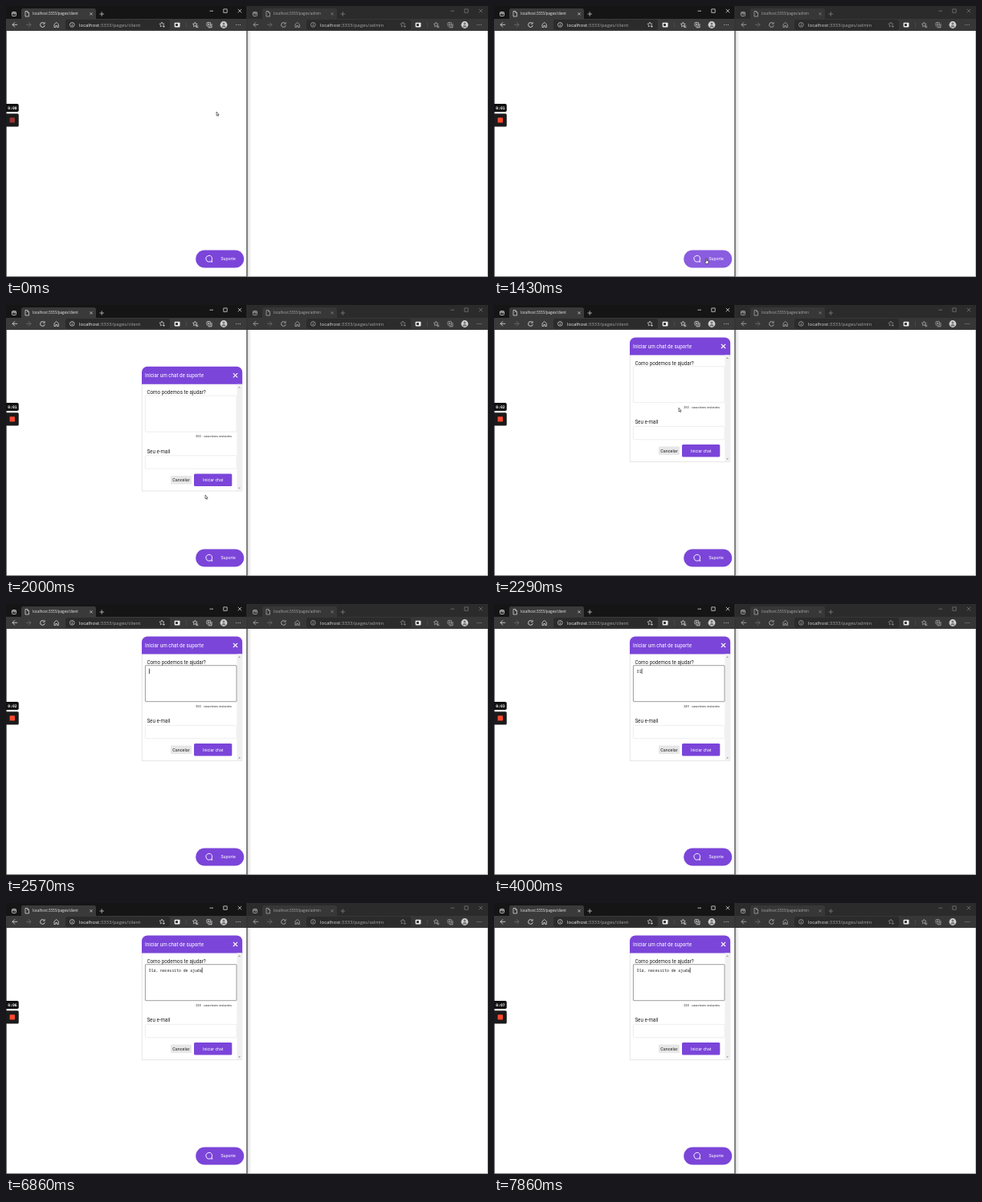
Animation, 600 px wide and 338 px high, one loop 8 s. Source, as an HTML page with a canvas:

```html
<!DOCTYPE html>
<html lang="pt">
<head>
<meta charset="utf-8">
<title>Chat de suporte</title>
<style>
  html, body { margin: 0; width: 100%; height: 100%; overflow: hidden; background: #fff; }
  canvas { display: block; width: 600px; height: 338px; }
</style>
</head>
<body>
<canvas id="stage"></canvas>
<script>
const W = 600, H = 338, LOOP = 8000;
const PURPLE = '#7b45d9', HOVER = '#8a5ce0';
const UI = '"Open Sans", "Noto Sans", sans-serif';
const SANS = 'Roboto, Arial, sans-serif';
const MONO = '"Noto Sans Mono", "DejaVu Sans Mono", monospace';
const MESSAGE = 'Olá, necessito de ajuda';

const OPEN = 1610, RISE = 600, FOCUS = 2430, LAST_KEY = 6860;
const KEYS = [[3570, 0], [3720, 1], [3930, 2], [4140, 3], [4430, 4], [4860, 5],
              [5140, 5], [5860, 11], [6140, 13], [LAST_KEY, 23]];
const MOUSE = [[140, 262, 132], [1140, 264, 316], [1570, 264, 316],
               [2000, 248, 237], [2400, 226, 104]];

const canvas = document.getElementById('stage');
const dpr = window.devicePixelRatio || 1;
canvas.width = W * dpr;
canvas.height = H * dpr;
const c = canvas.getContext('2d');

function rect(x, y, w, h, color) {
  c.fillStyle = color;
  c.fillRect(x, y, w, h);
}

function round(x, y, w, h, r, color) {
  c.beginPath();
  c.roundRect(x, y, w, h, r);
  c.fillStyle = color;
  c.fill();
}

function frame(x, y, w, h, color, r = 0, width = 0.7) {
  c.beginPath();
  c.roundRect(x, y, w, h, r);
  c.strokeStyle = color;
  c.lineWidth = width;
  c.stroke();
}

function line(points, color, width = 0.8, close = false) {
  c.beginPath();
  for (let i = 0; i < points.length; i += 2) c.lineTo(points[i], points[i + 1]);
  if (close) c.closePath();
  c.strokeStyle = color;
  c.lineWidth = width;
  c.stroke();
}

function disc(x, y, r, color) {
  c.beginPath();
  c.arc(x, y, r, 0, 7);
  c.fillStyle = color;
  c.fill();
}

function arc(x, y, r, from, to, color, width = 0.8) {
  c.beginPath();
  c.arc(x, y, r, from, to);
  c.strokeStyle = color;
  c.lineWidth = width;
  c.stroke();
}

function cross(x, y, r, color, width) {
  line([x - r, y - r, x + r, y + r], color, width);
  line([x + r, y - r, x - r, y + r], color, width);
}

function text(str, x, y, size, color, family, weight = '') {
  c.font = `${weight} ${size}px ${family}`;
  c.fillStyle = color;
  c.fillText(str, x, y);
}

function star(x, y, r, color) {
  const pts = [];
  for (let i = 0; i < 10; i++) {
    const a = -Math.PI / 2 + i * Math.PI / 5, d = i % 2 ? r * 0.48 : r;
    pts.push(x + d * Math.cos(a), y + d * Math.sin(a));
  }
  line(pts, color, 0.7, true);
}

// Interpolates rows of [time, ...values].
function track(rows, t, ease = p => p) {
  if (t <= rows[0][0]) return rows[0].slice(1);
  for (let i = 1; i < rows.length; i++) {
    const a = rows[i - 1], b = rows[i];
    if (t < b[0]) {
      const p = ease((t - a[0]) / (b[0] - a[0]));
      return a.slice(1).map((v, k) => v + (b[k + 1] - v) * p);
    }
  }
  return rows[rows.length - 1].slice(1);
}

const smooth = p => p * p * (3 - 2 * p);

function browser(x, page, active) {
  const ink = active ? '#e4e4e4' : '#b4b4b4';
  const dim = active ? '#d8d8d8' : '#8c8c8c';
  const bar = active ? '#3a3a3a' : '#373737';
  c.save();
  c.translate(x, 0);
  rect(0, 0, 300, 17, active ? '#151515' : '#2b2b2b');
  round(19, 3, 93, 16, 2.5, bar);
  rect(0, 16, 300, 15, bar);
  round(74, 17, 130, 12.5, 2.5, '#2b2b2b');

  // Tab strip
  frame(7.5, 7.5, 5, 5, ink, 1, 0.8);
  line([7.5, 9, 12.5, 9], ink, 0.9);
  line([10.2, 9, 10.2, 11], ink, 0.8);
  line([24, 6.5, 26.7, 6.5, 28.5, 8.3, 28.5, 13, 24, 13], ink, 0.7, true);
  line([26.6, 6.6, 26.6, 8.4, 28.4, 8.4], ink, 0.6);
  text('localhost:3333/pages/' + page, 33, 11.3, 4.48, active ? '#eee' : '#aaa', UI);
  cross(106, 9.8, 1.6, dim, 0.7);
  line([116.5, 10, 122, 10], dim, 0.7);
  line([119.2, 7.2, 119.2, 12.8], dim, 0.7);
  const ctl = active ? '#d8d8d8' : '#757575';
  line([253.5, 6.2, 258, 6.2], ctl, 0.8);
  frame(270.8, 3.9, 4.4, 4.4, ctl, 0, 0.8);
  cross(291, 6.1, 2.2, ctl, 0.8);

  // Toolbar
  line([14.2, 23.3, 8, 23.3], ink);
  line([11, 20.3, 8, 23.3, 11, 26.3], ink);
  line([25, 23.3, 31, 23.3], '#707070');
  line([28, 20.3, 31, 23.3, 28, 26.3], '#707070');
  arc(45.5, 23.5, 2.9, 0.2, 5.4, ink);
  line([48.2, 20, 48.2, 22.3, 45.9, 22.3], ink, 0.7);
  line([60, 26.5, 60, 22.9, 62.7, 20.5, 65.4, 22.9, 65.4, 26.5, 63.6, 26.5,
        63.6, 24.5, 61.8, 24.5, 61.8, 26.5], ink, 0.7, true);
  arc(82.3, 23.4, 2.8, 0, 7, ink, 0.7);
  line([82.3, 22.9, 82.3, 25], ink, 0.7);
  rect(81.95, 21.6, 0.7, 0.7, ink);
  text('localhost', 91, 25.5, 6, active ? '#f4f4f4' : '#ddd', UI);
  const host = c.measureText('localhost').width;
  text(':3333/pages/' + page, 91 + host, 25.5, 6, '#a4a4a4', UI);
  star(194, 23.3, 3.2, dim);
  round(194.4, 23.8, 3.6, 3.2, 1, '#2b2b2b');
  line([194.9, 25.4, 197.9, 25.4], dim, 0.7);
  line([196.4, 23.9, 196.4, 26.9], dim, 0.7);
  round(209.7, 20.8, 6.8, 5.6, 0.8, '#eee');
  rect(211, 22.2, 3, 2.8, '#333');
  line([224.5, 20.5, 224.5, 26.5], '#555', 0.6);
  star(235.3, 23.3, 3, ink);
  line([236.5, 25, 239.3, 25], ink, 0.7);
  line([236.5, 26.6, 239.3, 26.6], ink, 0.7);
  frame(250, 20.5, 4.6, 4.6, ink, 0.8);
  line([251.7, 26.8, 256, 26.8, 256, 22.2], ink, 0.8);
  line([252.3, 21.6, 252.3, 24], ink, 0.7);
  line([251.1, 22.8, 253.5, 22.8], ink, 0.7);
  disc(271, 23.5, 4.4, '#d2d2d2');
  disc(271, 22.1, 1.5, '#777');
  c.beginPath();
  c.arc(271, 26.5, 2.6, Math.PI, 0);
  c.fill();
  for (let i = 0; i < 3; i++) disc(286.8 + i * 2.3, 23.5, 0.5, ink);
  c.restore();
}

function windows() {
  rect(0, 0, W, H, '#fff');
  browser(300, 'admin', false);
  browser(0, 'client', true);
  rect(300.5, 31, 303 - 300.5, 307, '#e6e6e6');
  rect(303, 31, 2, 307, '#f6f6f6');
  rect(0, 31, 0.8, 307, '#4a4a4a');
  rect(299.4, 0, 1.2, 338, '#333');
  rect(0, 337.3, 300, 0.7, '#4a4a4a');
  rect(300, 337.3, 300, 0.7, '#777');
  rect(599.4, 31, 0.6, 307, '#999');
}

function recorder(t) {
  round(-2, 122, 17.8, 10, 1.8, '#111');
  text('0:0' + Math.max(0, Math.floor((t - 80) / 1000)), 2.2, 128.8, 4.75, '#fff',
    '"DejaVu Sans Mono", monospace', 'bold');
  round(-2, 134.2, 17.8, 16.2, 1.5, '#1b1b1b');
  const p = Math.min(1, Math.max(0, (t - 140) / 400));
  round(4.6, 139.2, 6.4, 6.4, 0.6, `rgb(${150 + 105 * p}, ${52 + 20 * p}, ${52 - 4 * p})`);
}

function supportButton(hover) {
  round(236.2, 304.5, 60, 22, 11, hover ? HOVER : PURPLE);
  arc(252.8, 315.2, 3.8, 1.2, 6.9, '#fff', 0.95);
  line([254.2, 318.8, 256.9, 319.1, 256, 317.2], '#fff', 0.95);
  text('Suporte', 267.4, 317.2, 5.27, '#fff', SANS);
}

function typed(t) {
  return Math.floor(track(KEYS, t)[0] + 1e-6);
}

function caretOn(t) {
  if (t < FOCUS) return false;
  if (t < KEYS[0][0]) return (t - FOCUS) % 1000 < 500;
  return t < LAST_KEY || (t - LAST_KEY) % 1000 < 500;
}

function dialog(t) {
  if (t < OPEN) return;
  const left = 1 - Math.min(1, (t - OPEN) / RISE);
  const n = typed(t), dark = '#222', soft = '#e9e9e9';
  c.save();
  c.beginPath();
  c.rect(0, 31, 300, 306);
  c.clip();
  c.translate(0, 300 * left * left);

  rect(169, 61, 125, 134.8, '#fff');
  frame(169.3, 61, 124.5, 134.6, '#d4d4d4', 0, 0.6);
  round(169, 40.4, 125.2, 22, [7, 7, 0, 0], PURPLE);
  text('Iniciar um chat de suporte', 173, 53.6, 6.3, '#fff', SANS);
  cross(285.5, 51.4, 2.6, '#fff', 1.1);

  rect(287.4, 62.4, 6.2, 133, '#f0f0f0');
  c.fillStyle = '#999';
  for (const [y, d] of [[66.2, -1], [192, 1]]) {
    c.beginPath();
    c.moveTo(289.2, y - d * 0.7);
    c.lineTo(292, y - d * 0.7);
    c.lineTo(290.6, y + d * 0.9);
    c.fill();
  }

  text('Como podemos te ajudar?', 175.4, 74.8, 6.28, dark, SANS);
  frame(173.4, 76.7, 113.6, 45, t < FOCUS ? soft : '#858585', 0.4, 0.8);
  const shown = MESSAGE.slice(0, n);
  text(shown, 177.8, 85.7, 4.78, '#222', MONO);
  if (caretOn(t)) rect(177.9 + c.measureText(shown).width, 80.6, 0.8, 6.4, '#222');

  text(250 - Math.max(0, n - 1), 236.2, 128.6, 3.85, '#333', SANS);
  text('caracteres restantes', 246, 128.6, 3.85, '#333', SANS);

  text('Seu e-mail', 175.4, 148.2, 6.28, dark, SANS);
  frame(173.4, 151.4, 113.6, 16.4, soft, 1, 0.7);

  round(205, 176.6, 26, 10.4, 1.2, '#e7e7e7');
  text('Cancelar', 207.3, 183.6, 5.4, '#222', SANS);
  round(234, 174, 47.3, 15.6, 1.5, PURPLE);
  text('Iniciar chat', 245, 183.5, 5.2, '#fff', SANS);
  c.restore();
}

function shape(points, x, y) {
  c.beginPath();
  for (let i = 0; i < points.length; i += 2) c.lineTo(x + points[i], y + points[i + 1]);
  c.closePath();
  c.fillStyle = '#fff';
  c.fill();
  c.strokeStyle = '#222';
  c.lineWidth = 0.6;
  c.stroke();
}

function pointer(x, y, hand) {
  if (hand) {
    shape([0, -1, 0.9, -1, 0.9, 1.5, 3, 2, 3, 4, 2.2, 5.6, -0.2, 5.6, -1.8, 3, -1, 2.6, 0, 3.2], x, y);
  } else {
    shape([0, 0, 0, 4.6, 1, 3.8, 1.8, 5.4, 2.5, 5.1, 1.8, 3.5, 3.1, 3.4], x, y);
  }
}

function draw(t) {
  c.setTransform(dpr, 0, 0, dpr, 0, 0);
  const [x, y] = track(MOUSE, t, smooth);
  const hover = x > 236 && x < 296 && y > 304 && y < 327;
  windows();
  dialog(t);
  supportButton(hover);
  recorder(t);
  if (t < FOCUS) pointer(x, y, hover);
}

const start = performance.now();
function tick() {
  draw((performance.now() - start) % LOOP);
  requestAnimationFrame(tick);
}
tick();
</script>
</body>
</html>
```
